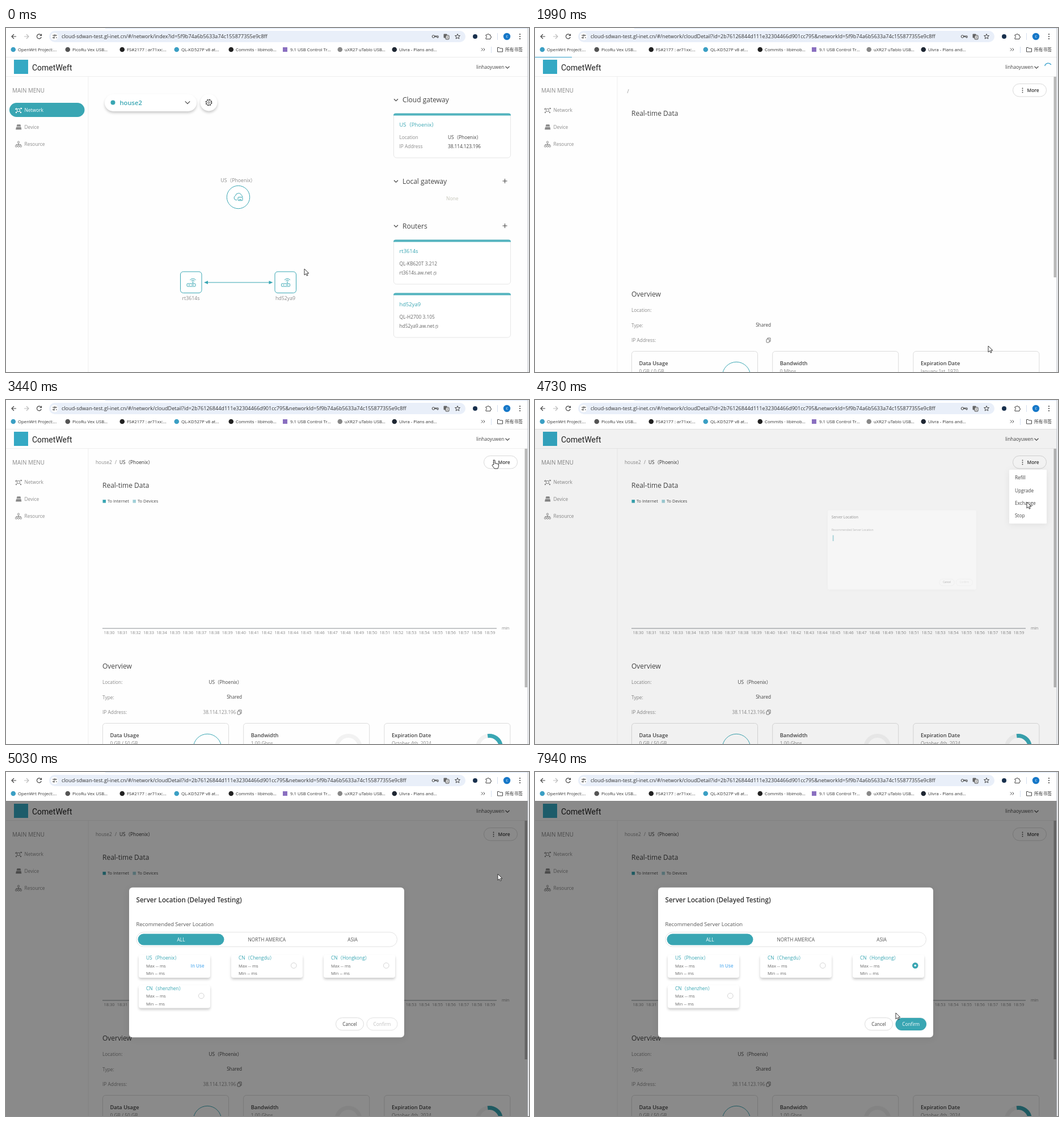
An HTML page that plays this animation: 922 px wide and 607 px high, repeating every 8000 ms.

```html
<!DOCTYPE html>
<html lang="en">
<head>
<meta charset="utf-8">
<title>Network console</title>
<style>
html, body { margin: 0; width: 100%; height: 100%; overflow: hidden; background: #fff; }
svg { display: block; font-family: 'Open Sans', 'Noto Sans CJK SC', 'Noto Sans CJK', sans-serif; }
text { white-space: pre; }
.lift { filter: drop-shadow(0 3px 2px #0003); }
.pop { filter: drop-shadow(0 2px 6px #0001); }
</style>
</head>
<body>
<svg id="stage" width="922" height="607" viewBox="0 0 922 607"></svg>
<script>
const TEAL = '#39a6b3', INK = '#444', GREY = '#8a8a8a', THUMB = '#b8b8b8', TRACK = '#f2f2f2';
const MID = 'text-anchor="middle"', END = 'text-anchor="end"', SEMI = 'font-weight="600"';
const HOST = 'cloud-sdwan-test.gl-inet.cn/#/network/', NET_ID = '5f9b74a6b5633a74c155877355e9c8ff';
const CITY = 'US（Phoenix）';

// y is the vertical centre of the capitals
const text = (x, y, s, size = 8.35, fill = INK, more = '') =>
  `<text x="${x}" y="${y + size * .36}" font-size="${size}" fill="${fill}" ${more}>${s}</text>`;
const rect = (x, y, w, h, r, fill, stroke = 'none', more = '') =>
  `<rect x="${x}" y="${y}" width="${w}" height="${h}" rx="${r}" fill="${fill}" stroke="${stroke}" ${more}/>`;
const circle = (x, y, r, fill, stroke = 'none', more = '') =>
  `<circle cx="${x}" cy="${y}" r="${r}" fill="${fill}" stroke="${stroke}" ${more}/>`;
const path = (d, stroke, width = 1, fill = 'none') =>
  `<path d="${d}" stroke="${stroke}" stroke-width="${width}" fill="${fill}"/>`;
const group = (id, ...parts) => `<g id="${id}">${parts.flat().join('')}</g>`;
const at = (x, y, s) => `<g transform="translate(${x} ${y})">${s}</g>`;
const chevron = (x, y, w = 3.5) => path(`M${x - w} ${y - w / 2}l${w} ${w}l${w} ${-w}`, INK, 1.1);
const plus = (x, y) => path(`M${x - 4} ${y}h8M${x} ${y - 4}v8`, INK);
const copyIcon = (x, y, k, c) => at(x, y, `<g transform="scale(${k})">` +
  rect(-3.5, -2, 5, 6, 1, 'none', c) + path('M-1.5-2v-2h5v6h-2', c) + '</g>');

const bookmarks = [
  ['OpenWrt Project:...', '#3b9fc4'], ['PicoRu Vex USB...', '#555'],
  ['FS#2177 : ar71xx:...', '#222'], ['QL-KD527P v8 at...', '#3b9fc4'],
  ['Commits · libimob...', '#222'], ['9.1 USB Control Tr...', '#8a6fc0'],
  ['uXR27 uTablo USB...', '#888'], ['Ulvra - Plans and...', '#1f2733']];

const browser = () => [
  rect(0, 0, 922, 51, 0, '#fff'), rect(175, 0, 747, 1, 0, '#d9e5f8'),
  path('M18 15h-8m4-4l-4 4l4 4', INK, 1.2), path('M32 15h8m-4-4l4 4l-4 4', '#bbb', 1.2),
  path('M62 13a4 4 0 1 0 .3 3M62.5 10.5v3h-3', INK, 1.2),
  rect(76, 5, 734, 20, 10, '#e9eff9'), circle(85.5, 15, 6.5, '#fff'),
  path('M82 13h3M88 17h2M82 17h1M87 13h3', INK), circle(86, 13, 1.2, 'none', INK), circle(84.5, 17, 1.2, 'none', INK),
  group('url'),
  circle(753.5, 15, 2.3, 'none', INK), path('M756 14h6v3h-2v-1.5h-4z', INK),
  rect(771.5, 10.5, 6, 7, 1, '#666'), rect(775, 13, 6, 7, 1, '#fff', INK), text(778, 16.5, '文', 4.5, INK, MID),
  path('M796 10.5l1.3 3h3.2l-2.5 2.2l.8 3.3l-2.8-1.8l-2.8 1.8l.8-3.3l-2.5-2.2h3.2z', INK),
  circle(827, 15, 4, '#18304d'),
  path('M846 12h2.5a1.5 1.5 0 0 1 3 0h2.5v2.5a1.5 1.5 0 0 1 0 3v2h-8v-2.5a1.5 1.5 0 0 0 0-3z', INK),
  rect(866, 9, 1, 12, 0, '#d5dff0'), circle(883, 15, 6.2, '#1778c8'), text(883, 14.5, 'c', 6.5, '#fff', MID),
  [11, 15, 19].map(y => circle(906, y, 1.1, INK)),
  bookmarks.map(([s, c], i) => (i == 5 ? rect(488, 34, 8, 8, 0, c) : circle(12.8 + 96 * i, 38, 4.3, c)) +
    text(21 + 96 * i, 38.5, s, 7.75, '#333')),
  path('M838 35.5l2.5 2.5l-2.5 2.5M841.5 35.5l2.5 2.5l-2.5 2.5', INK),
  rect(855, 33, 1, 11, 0, '#d5dff0'),
  path('M866.5 34.5h3l1.2 1.5h4.8v6h-9z', INK), text(880, 38.5, '所有书签', 7.75, '#333')
].flat().join('');

const header = () => [
  rect(0, 51, 922, 556, 0, '#fefefe'), rect(14, 56, 25, 25, 0, '#35a9c4'),
  text(46, 69.5, 'CometWeft', 14, '#222', 'font-family="Roboto, sans-serif"'),
  text(829, 69, 'linhaoyuwen', 8.3), chevron(884, 69.5),
  rect(0, 51, 922, .8, 0, '#e6e6e6'), rect(0, 85, 920, 1, 0, '#eee'), rect(144.5, 86, 1, 521, 0, '#eee'),
  text(11, 110, 'MAIN MENU', 9.9, GREY),
  path('M17.5 179h9.5l-.7-4h-8zM19 173.5h7l-.8-3h-5.4z', GREY, .6, GREY),
  text(32.5, 175, 'Device', 8.4, GREY),
  path('M22 203v4M18 208v-2.5h8v2.5', GREY),
  [[22, 201.5], [18, 208.5], [22, 208.5], [26, 208.5]].map(p => circle(...p, 1.6, '#fff', GREY)),
  text(32.5, 204.5, 'Resource', 8.4, GREY)
].flat().join('');

const networkItem = c => [
  path('M18 141l8 8M26 141l-8 8', c, .9), circle(22, 145, 2.6, c == GREY ? '#fff' : TEAL, c),
  [[17.5, 143], [27, 142], [26, 149], [18, 149]].map(p => circle(...p, 1.2, c)),
  text(32.5, 145, 'Network', 8.4, c)].flat().join('');

const sideCard = (y, title, rows) => [
  rect(683.5, y, 206, 78, 5, '#fff', '#e6e6e6'),
  path(`M683 ${y + 3.5}v-.5q0-3.5 4-3.5h199q4 0 4 3.5v.5z`, 'none', 0, '#52b3be'),
  text(693.5, y + 20, title, 9.4, TEAL), rows].flat().join('');

const router = (x, name) => at(x, 448.5, [
  rect(-18.5, -18.5, 37.5, 37.5, 5, '#fff', TEAL),
  rect(-7, 2.5, 15, 5, 1.2, 'none', TEAL), path('M3.5-2v4.5M-4 5h2M1 5h4', TEAL),
  path('M.5-2a4 4 0 0 1 6 0M-1.5-4a7 7 0 0 1 10 0', TEAL),
  text(0, 28.5, name, 8.8, GREY, MID)].join(''));

const home = () => group('home',
  rect(6, 132, 132.5, 25, 12.5, TEAL), networkItem('#fff'),
  rect(174, 117, 162, 30, 15, '#fff', 'none', 'class="lift"'),
  circle(188.5, 131.5, 4, TEAL), text(200.5, 131.5, 'house2', 11.2, TEAL, SEMI), chevron(320, 131.5, 4.2),
  circle(357.5, 131.5, 15, '#fff', 'none', 'class="lift"'),
  circle(357.5, 131.5, 5.2, 'none', INK, 'stroke-dasharray="2.2 1.9" stroke-width="1.5"'),
  circle(357.5, 131.5, 4.4, 'none', INK), circle(357.5, 131.5, 1.7, 'none', INK),
  text(378.5, 268.5, CITY, 8.7, GREY), circle(409.5, 298.5, 20.2, '#fff', TEAL),
  path('M407 303.5h-2a4 4 0 0 1-.5-7.5a5.5 5.5 0 0 1 10.5-1a4 4 0 0 1 2 3', TEAL),
  rect(409, 298.5, 8, 6, 1, '#fff', TEAL), path('M411 302.5h4', TEAL),
  path('M352 449h115', TEAL), path('M349 449l7-3v6zM470.5 449l-7-3v6z', 'none', 0, TEAL),
  router(326, 'rt3614s'), router(492.5, 'hd52ya9'),
  [['Cloud gateway', 127], ['Local gateway', 270.5], ['Routers', 349.5]].map(([s, y], i) =>
    chevron(687.5, y) + text(699, y, s, 12, INK) + (i ? plus(879.5, y - .5) : '')),
  text(776, 301, 'None', 8.5, '#c4c4b8'),
  sideCard(151, CITY, [
    text(693.5, 193, 'Location', 8.35, GREY), text(779, 193, CITY, 8.35),
    text(693.5, 209, 'IP Address', 8.35, GREY), text(779, 209, '38.114.123.196', 8.2)]),
  [[374, 'rt3614s', 'QL-KB620T 3.212', 756], [468, 'hd52ya9', 'QL-H2700 3.105', 759]].map(([y, id, model, x]) =>
    sideCard(y, id, [text(693.5, y + 41.5, model, 8.35, '#666'), text(693.5, y + 58, id + '.aw.net', 8.35, '#666'),
      copyIcon(x, y + 59, .65, GREY)])));

const ring = (c, x, more = '') => circle(x, 613, 20.5, 'none', c, 'stroke-width="7" ' + more);
const amounts = (...list) => list.map((s, i) => text(183.5 + 248.2 * i, 605.5, s, 8.35, GREY));

const detail = () => group('detail', networkItem(GREY),
  rect(842.5, 98.5, 59, 22.5, 11.2, '#fff', '#d9d9d9'),
  [106.5, 110, 113.5].map(y => circle(859.5, y, .9, INK)), text(867.5, 110, 'More', 8.4, '#333', SEMI),
  text(170, 150.5, 'Real-time Data', 12), text(170, 469.5, 'Overview', 12),
  text(170, 498, 'Location:', 8.35, GREY), text(170, 524.5, 'Type:', 8.35, GREY),
  text(170, 551, 'IP Address:', 8.35, GREY), text(416, 524.5, 'Shared', 8.2, INK, END),
  copyIcon(411.5, 551, 1, '#777'),
  ['Data Usage', 'Bandwidth', 'Expiration Date'].map((s, i) =>
    rect(170.5 + 248.2 * i, 570.5, 222, 60, 5, 'none', '#dcdcdc') + text(183.5 + 248.2 * i, 592, s, 9.3, INK, SEMI)),
  circle(355, 614, 24.7, 'none', TEAL),
  group('loading', text(162.5, 112, '/', 8.35, GREY), amounts('0 GB / 0 GB', '0 Mbps', 'January 1st, 1970'),
    rect(0, 50.5, 65, 1.5, 0, '#2e9dc8', 'none', 'id="bar"'),
    group('spin', path('M898.8 67a6 6 0 0 1 11-2', '#42a5cf', 1.4)),
    rect(914.5, 86, 4.5, 354, 0, THUMB)),
  group('loaded',
    text(158, 110, 'house2', 8.35, GREY), text(192, 110, '/', 8.35, GREY), text(200, 110, CITY, 8.35, '#333'),
    rect(170.5, 176, 5.5, 5.5, 0, TEAL), text(179, 178.5, 'To Internet', 7.45),
    rect(223.5, 176, 5.5, 5.5, 0, '#9fd0d8'), text(232, 178.5, 'To Devices', 7.45),
    rect(170, 402.5, 695, 1, 0, '#8c8f94'), text(874, 402, 'min', 7.5, GREY),
    Array.from({ length: 30 }, (_, i) => text(182 + 23.14 * i, 410.5, '18:' + (30 + i), 7.45, GREY, MID)),
    text(357.5, 498, CITY, 8.3), text(405.5, 551, '38.114.123.196', 8.2, GREY, END),
    amounts('0 GB / 50 GB', '1.00 Gbps', 'October 4th, 2024'),
    ring(TRACK, 603.5), ring(TRACK, 852),
    ring(TEAL, 852, 'stroke-dasharray="46 200" transform="rotate(-98 852 613)"'),
    rect(914.5, 86, 4.5, 421, 0, THUMB)));

const menu = () => group('menu', rect(836, 123, 66, 95, 1.5, '#fff', 'none', 'class="pop"'),
  ['Refill', 'Upgrade', 'Exchange', 'Stop'].map((s, i) => text(846, 137.3 + 22.4 * i, s, 8.25)));

const button = (x, w, y, s, fill, stroke, ink) =>
  rect(x, y, w, 22, 11, fill, stroke) + text(x + w / 2, y + 11, s, 8.2, ink, MID);
const tabs = top => rect(230, top + 79, 459.5, 25.5, 12.7, '#fff', '#e3e3e3') +
  rect(232.5, top + 81.8, 152, 20, 10, TEAL) +
  ['ALL', 'NORTH AMERICA', 'ASIA'].map((s, i) =>
    text(308.5 + 151.3 * i, top + 91.8, s, 8.4, i ? '#555' : '#fff', MID)).join('');
const dialog = (top, h, title, body) => [
  rect(217, top, 485, h, 6, '#fff', 'none', 'class="pop"'),
  text(229.5, top + 22.5, title, 11.65, '#333', SEMI),
  text(229.5, top + 65.2, 'Recommended Server Location', 9.4, '#555'), body,
  button(581.5, 49, top + h - 34.5, 'Cancel', '#fff', '#dcdcdc', INK),
  button(636, 54, top + h - 34.5, 'Confirm', '#fff', '#e2e2e2', '#c0c0c0')].flat().join('');

const servers = [[234, 322.5, CITY], [397, 322.5, 'CN（Chengdu）'], [560, 322.5, 'CN（Hongkong）'], [234, 376, 'CN（shenzhen）']];
const server = ([x, y, name], i) => rect(x, y, 126, 40.5, 4, '#fff', 'none', 'class="lift"') +
  text(x + 13, y + 5.5, name, 8.35, TEAL) + text(x + 13, y + 19.5, 'Max -- ms', 7.6, '#666') +
  text(x + 13, y + 33, 'Min -- ms', 7.6, '#666') +
  (i ? circle(x + 110.3, y + 19, 4.8, '#fff', '#d4d4d4') : text(x + 91.5, y + 19.5, 'In Use', 8, '#62b3f0', SEMI));

const stage = document.getElementById('stage');
stage.innerHTML = header() + home() + detail() + rect(0, 51, 920, 556, 0, '#000', 'none', 'id="dim"') + menu() +
  group('opening', dialog(206.7, 259.5, 'Server Location',
    group('tabs', tabs(206.7)) + rect(233, 288.5, 3.7, 19.5, 1, TEAL, 'none', 'id="stub"'))) +
  group('opened', dialog(203.7, 264.5, 'Server Location (Delayed Testing)', tabs(203.7) + servers.map(server).join('')),
    group('chosen', circle(670.3, 341.5, 5.2, TEAL), circle(670.3, 341.5, 1.8, '#fff'),
      button(635.5, 54.5, 434, 'Confirm', TEAL, 'none', '#fff'))) +
  browser() + rect(919.5, 0, 1.2, 607, 0, '#b9bec6') + rect(920.7, 0, 2, 607, 0, '#f3f4f6') +
  group('arrow', path('M0 0v11l2.6-2.4l1.7 3.6l1.8-.8l-1.7-3.5h3.5z', '#222', .9, '#fff')) +
  group('hand', path('M-1.2 8V1.2a1.2 1.2 0 0 1 2.4 0V6l2-.4l.3.8l2-.1l.3.8l1.7.2v3.7l-1.5 4h-6l-4-5.5q0-1.5 1.3-1.2z', '#222', .9, '#fff'));

const $ = id => document.getElementById(id);
const show = (id, on) => $(id).style.display = on ? '' : 'none';
const place = (id, transform, opacity = 1) => {
  $(id).setAttribute('transform', transform);
  $(id).setAttribute('opacity', opacity);
};
const setUrl = s => { if ($('url').textContent != s) $('url').innerHTML = text(98, 15, s.replace('&', '&amp;'), 9.08, '#333'); };

// pointer path: time, x, y
const track = [[140, 526, 425], [560, 412, 300], [820, 412, 300], [1100, 534, 377], [1400, 790, 455], [1540, 866, 510],
  [1680, 799, 561], [2290, 799, 561], [3010, 734, 354], [3300, 875, 116], [3440, 861, 106], [3880, 861, 106],
  [4450, 867, 180], [5030, 867, 180], [5700, 458, 354], [5840, 458, 354], [6110, 449, 337], [6300, 449, 337],
  [6690, 362, 346], [7360, 614, 337], [7790, 614, 337], [7940, 636, 425]];
const STEP = 141.8;

function pointer(t) {
  const q = (Math.floor(t / STEP + .25) + .4) * STEP;
  const i = track.findIndex(k => k[0] > q);
  if (i < 1) return track.at(i).slice(1);
  const [a, b] = [track[i - 1], track[i]], f = (q - a[0]) / (b[0] - a[0]);
  return [1, 2].map(n => a[n] + (b[n] - a[n]) * f);
}

function clickable(x, y, t) {
  const inside = (l, top, w, h) => x >= l && x <= l + w && y >= top && y <= top + h;
  if (t < 1990) return Math.hypot(x - 409, y - 298) < 21;
  if (t < 4730) return inside(842, 98, 60, 23) || t >= 3740 && inside(836, 123, 66, 95);
  return t >= 5030 && servers.some(s => inside(s[0], s[1], 126, 41));
}

function draw(now) {
  const t = now % 8000, onHome = t < 1990, ready = t >= 2430;
  const phase = t < 4730 ? 0 : t < 4880 ? 1 : t < 5030 ? 2 : 3;
  show('home', onHome);
  show('detail', !onHome);
  show('loading', !ready);
  show('loaded', ready);
  setUrl(HOST + (onHome ? 'index?id=' : 'cloudDetail?id=2b76126844d111e32304466d901cc795&networkId=') + NET_ID);
  const since = Math.max(0, Math.floor((t - 1990) / STEP + .05));
  $('bar').setAttribute('width', 65 + since * 180);
  place('spin', `rotate(${since * 125} 904.5 68)`);

  $('dim').setAttribute('opacity', [0, .05, .37, .46][phase]);
  show('menu', t >= 3740 && phase < 3);
  const [squash, fade] = phase == 2 ? [.89, .45] : t < 3880 ? [.85, .6] : [1, 1];
  place('menu', `translate(0 123) scale(1 ${squash}) translate(0 -123)`, fade);

  show('opening', phase == 1 || phase == 2);
  show('tabs', phase == 2);
  show('stub', phase == 1);
  place('opening', `translate(867 180) scale(${phase == 1 ? .54 : .975}) translate(-867 -180)`, phase == 1 ? .38 : .97);
  show('opened', phase == 3);
  show('chosen', t >= 7790);

  const [x, y] = pointer(t), hand = clickable(x, y, t);
  show('hand', hand);
  show('arrow', !hand);
  place(hand ? 'hand' : 'arrow', `translate(${x} ${y})`);
}

const start = performance.now();
(function loop() {
  draw(performance.now() - start);
  requestAnimationFrame(loop);
})();
</script>
</body>
</html>
```
